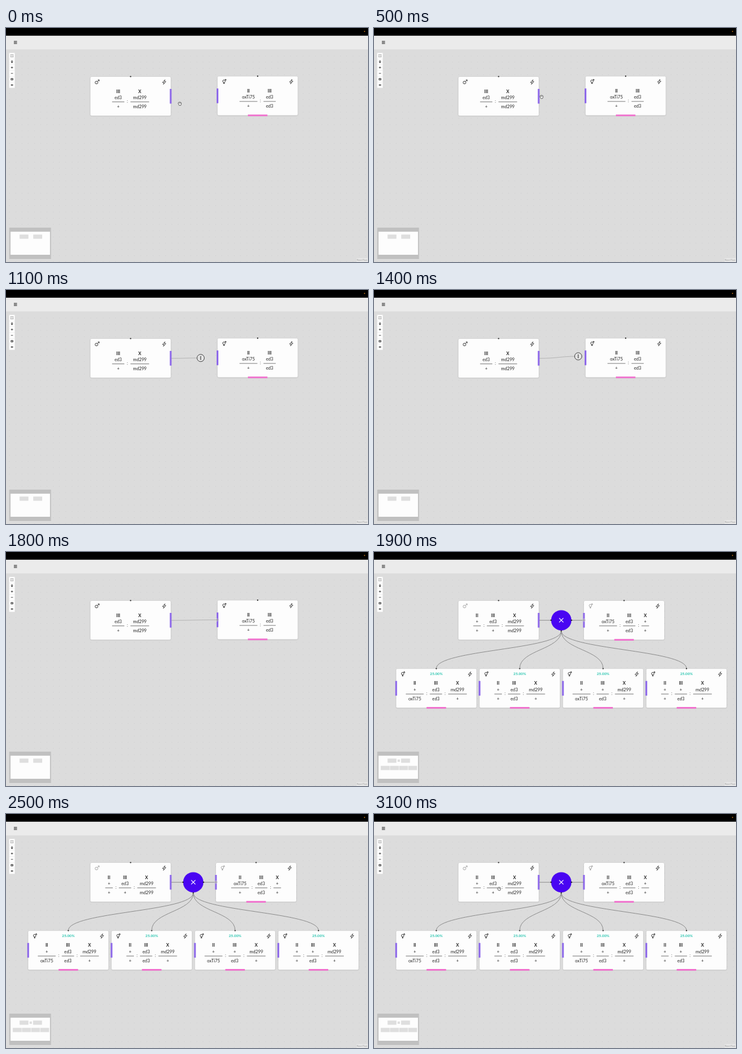
Write an HTML page with a canvas that moves like this. It is 600 px wide and 388 px high and loops after 3200 ms.

```html
<!DOCTYPE html>
<html lang="en">
<head>
<meta charset="utf-8">
<title>Cross editor</title>
<style>
  html, body { margin: 0; width: 100%; height: 100%; overflow: hidden; background: #dcdcdc; }
  canvas { display: block; width: 100%; height: 100%; }
</style>
</head>
<body>
<canvas id="stage"></canvas>
<script>
const W = 600, H = 388, LOOP = 3200, STEP = 100;
const INK = '#242424', PURPLE = '#8d68ea', PINK = '#f070cd', EDGE = '#858585';
const CARD_W = 133, CARD_H = 64.5;
const SANS = 'Lato, sans-serif';

const canvas = document.getElementById('stage');
const ctx = canvas.getContext('2d');
const dpr = window.devicePixelRatio || 1;
canvas.width = W * dpr;
canvas.height = H * dpr;

// Each gene: [chromosome, upper allele, lower allele]
const PARENTS_BEFORE = [
  { x: 140, y: 81, sex: 'male', genes: [['III', 'ed3', '+'], ['X', 'md299', 'md299']] },
  { x: 350.6, y: 80.3, sex: 'both', genes: [['II', 'oxTi75', '+'], ['III', 'ed3', 'ed3']] }
];
const PARENTS_AFTER = [
  { x: 140, y: 81, sex: 'male', faded: true,
    genes: [['II', '+', '+'], ['III', 'ed3', '+'], ['X', 'md299', 'md299']] },
  { x: 348, y: 81, sex: 'both', faded: true,
    genes: [['II', 'oxTi75', '+'], ['III', 'ed3', 'ed3'], ['X', '+', '+']] }
];
const CHILDREN = [['oxTi75', 'ed3'], ['+', 'ed3'], ['oxTi75', '+'], ['+', '+']].map(([low, top], i) => ({
  x: 36.8 + i * 138.2, y: 193.8, sex: 'both', share: '25.00%',
  genes: [['II', '+', low], ['III', top, 'ed3'], ['X', 'md299', '+']]
}));

// Cursor waypoints: [ms, x, y]
const PATH = [
  [0, 288, 125.5], [200, 286, 123], [400, 280, 116], [600, 275.3, 112.3],
  [700, 274.8, 112.8], [800, 284, 115], [900, 300.5, 116.8], [1000, 314, 115],
  [1200, 331.3, 110.5], [1300, 336, 109.8], [1400, 338.5, 110], [1500, 341, 111],
  [1700, 348.3, 113], [1800, 350, 112.6], [1900, 348, 113], [2500, 348, 113],
  [2700, 318, 115], [2900, 240, 121], [3100, 207.3, 124]
];

function cursorAt(t) {
  const i = PATH.findIndex(p => p[0] >= t);
  if (i === 0) return PATH[0].slice(1);
  const [t0, x0, y0] = PATH[i - 1], [t1, x1, y1] = PATH[i];
  const k = (t - t0) / (t1 - t0);
  return [x0 + (x1 - x0) * k, y0 + (y1 - y0) * k];
}

function rect(x, y, w, h, color, r = 0) {
  ctx.fillStyle = color;
  ctx.beginPath();
  ctx.roundRect(x, y, w, h, r);
  ctx.fill();
}

function dot(x, y, r, color) {
  ctx.fillStyle = color;
  ctx.beginPath();
  ctx.arc(x, y, r, 0, 7);
  ctx.fill();
}

function stroke(path, color, width) {
  ctx.strokeStyle = color;
  ctx.lineWidth = width;
  ctx.stroke(new Path2D(path));
}

function at(x, y, draw) {
  ctx.save();
  ctx.translate(x, y);
  draw();
  ctx.restore();
}

function text(s, x, y, size, color = INK, weight = 400, align = 'center') {
  ctx.font = `${weight} ${size}px ${SANS}`;
  ctx.fillStyle = color;
  ctx.textAlign = align;
  ctx.fillText(s, x, y);
}

function sexIcon(x, y, sex, color, width) {
  at(x, y, () => {
    if (sex === 'male') {
      stroke('M1.3 .9A2.3 2.3 0 1 1-3.3 .9A2.3 2.3 0 1 1 1.3 .9M.7-.8L3.4-3.4M1.2-3.4H3.4V-1.2', color, width);
    } else {
      stroke('M1.8-.6A2.1 2.1 0 1 1-2.4-.6A2.1 2.1 0 1 1 1.8-.6M1.2-2.1L3.1-3.5M1.2-3.5H3.1V-1.7M-.3 1.5V4M-1.6 2.8H1', color, width);
    }
  });
}

function bolt(x, y) {
  at(x, y, () => stroke('M1.3-3.8L-2.9 .8H-.2L-1.3 3.9L2.9-.8H.2Z', INK, .75));
}

function genotype(genes, cx, y) {
  const size = 7.25, pad = 8.28, gap = 10.1;
  ctx.font = `400 ${size}px ${SANS}`;
  const widths = genes.map(g => Math.max(ctx.measureText(g[1]).width, ctx.measureText(g[2]).width) + pad);
  const total = widths.reduce((a, b) => a + b, 0) + gap * (genes.length - 1);
  let x = cx - total / 2;
  genes.forEach(([name, top, low], i) => {
    const w = widths[i], mid = x + w / 2;
    text(name, mid, y + 26.5, size, INK, 700);
    text(top, mid, y + 36.8, size);
    text(low, mid, y + 51.8, size);
    rect(x, y + 41.2, w, .7, '#4a4a4a');
    if (i < genes.length - 1) text(':', x + w + gap / 2, y + 42.8, size, '#555');
    x += w + gap;
  });
}

function card({ x, y, sex, genes, share, faded }) {
  const cx = x + CARD_W / 2;
  ctx.save();
  ctx.shadowColor = 'rgba(0,0,0,.2)';
  ctx.shadowBlur = 2 * dpr;
  ctx.shadowOffsetY = .5 * dpr;
  rect(x, y, CARD_W, CARD_H, '#fdfdfd', 2);
  ctx.restore();

  sexIcon(x + 11, y + 8.5, sex, faded ? '#777' : INK, faded ? .6 : .85);
  bolt(x + 122.2, y + 8.6);
  if (share) text(share, cx, y + 10.3, 6.2, '#25c4ae', 700);
  genotype(genes, cx, y);

  dot(cx, y - .5, 1.1, '#222');
  if (sex === 'male') {
    rect(x + 131.5, y + 20, 2.9, 24.4, PURPLE);
  } else {
    rect(x - 1.5, y + 20, 2.9, 24.4, PURPLE);
    rect(cx - 16.2, y + 63.2, 32.4, 2.7, PINK);
  }
}

function background() {
  rect(0, 0, W, H, '#dcdcdc');
  ctx.fillStyle = 'rgba(135,135,145,.42)';
  for (let y = 46; y < H; y += 10.35) {
    for (let x = 5.5; x < W; x += 10.35) ctx.fillRect(x, y, .6, .6);
  }
  rect(0, 12.7, W, 22.8, '#ebebeb');
  rect(0, 0, W, 12.7, '#000');
  dot(594.3, 5.6, .9, '#d48420');
  for (const y of [22, 23.9, 25.8]) rect(13, y - .4, 5.3, .9, '#222');
}

function controls() {
  rect(5.3, 41.3, 9.2, 58, '#fdfdfd', .5);
  for (let i = 1; i < 6; i++) rect(5.3, 41.3 + i * 9.67, 9.2, .4, '#e2e2e2');
  const icons = [
    'M-1.7-.7V-1.7H-.7M.7-1.7H1.7V-.7M1.7 .7V1.7H.7M-.7 1.7H-1.7V.7',
    'M-1 0V-.8A1 1 0 0 1 1-.8V0M-1.1 .3H1.1M-1.1 1H1.1M-1.1 1.5H1.1',
    'M-1.7 0H1.7M0-1.7V1.7',
    'M-1.7 0H1.7',
    'M-1.7-1.3H1.7V1.3H-1.7ZM-1.5 .9L-.4-.1L.3 .5L1 0L1.6 .8',
    'M-1.9 0Q0-2.2 1.9 0Q0 2.2-1.9 0M-.4 0H.4'
  ];
  icons.forEach((icon, i) => at(9.9, 46.2 + i * 9.67, () => stroke(icon, '#1c1c1c', .75)));
}

function minimap(crossed) {
  const node = '#dedede';
  rect(5.4, 331, 69.2, 52, '#c0c0c0');
  rect(7.5, 337.8, 65.4, 38.2, '#fdfdfd');
  rect(22.5, 342.5, 14.7, 7, node);
  rect(crossed ? 44.9 : 45.2, 342.5, 14.8, 7, node);
  if (!crossed) return;
  rect(39.2, 344.2, 3.7, 3.7, node);
  for (let i = 0; i < 4; i++) rect(11.2 + i * 15.2, 354.6, 14.6, 7, node);
}

function crossNode() {
  const x = 310.4, y = 113.2;
  stroke(`M274 ${y}H293.5M327.5 ${y}H347.5`, EDGE, .9);
  for (const c of CHILDREN) {
    const tx = c.x + CARD_W / 2;
    stroke(`M${x} 131C${x} 162 ${tx} 162 ${tx} 193`, EDGE, .9);
  }
  dot(x, y, 16.8, '#4905f2');
  at(x, y, () => stroke('M-3.5-3.5L3.5 3.5M3.5-3.5L-3.5 3.5', '#fff', 1.1));
  for (const [dx, dy] of [[-17, 0], [17, 0], [0, 17.6]]) dot(x + dx, y + dy, 1.1, '#222');
}

function hand() {
  const shape = new Path2D('M-2.7-1.2Q-2-2.6-1-2.3Q0-3.1 1-2.3Q2.4-2.3 2.6-.9Q2.9 1 1.7 2.8H-1Q-2.4 1.2-2.7-1.2Z');
  ctx.fillStyle = '#f4f4f4';
  ctx.fill(shape);
  stroke(shape, '#333', .7);
  stroke('M-1-1.6V-.2M.1-1.8V-.2M1.2-1.6V-.2', '#333', .5);
}

function crosshair() {
  const plus = 'M-2.6 0H2.6M0-2.9V2.9';
  stroke(plus, 'rgba(255,255,255,.8)', 1.3);
  stroke(plus, '#555', .5);
}

function cursor(t) {
  const [x, y] = cursorAt(t);
  const pressed = t >= 700 && t < 1800;
  if (t >= 700 && t < 1900) {
    const mid = (274 + x) / 2;
    stroke(`M274 113.3C${mid} 113.3 ${mid} ${y} ${x} ${y}`, '#999', .6);
  }
  at(x, y, () => {
    if (pressed) {
      dot(0, 0, 6, 'rgba(235,235,235,.65)');
      stroke('M6 0A6 6 0 1 1-6 0A6 6 0 1 1 6 0', '#333', .9);
      stroke('M-1.2-2.4H1.2M0-2.6V2.6M-1.2 2.4H1.2M-1 0H1', '#333', .7);
    } else if (t >= 600 && t <= 2500) {
      crosshair();
    } else {
      hand();
    }
  });
}

function draw(t) {
  const crossed = t >= 1900;
  ctx.setTransform(dpr, 0, 0, dpr, 0, 0);
  ctx.lineCap = 'butt';
  background();
  if (crossed) {
    PARENTS_AFTER.forEach(card);
    CHILDREN.forEach(card);
    crossNode();
  } else {
    PARENTS_BEFORE.forEach(card);
  }
  controls();
  minimap(crossed);
  rect(581, 381.5, 19, 6.5, 'rgba(255,255,255,.3)');
  text('React Flow', 598.8, 385.9, 3.6, '#999', 400, 'right');
  cursor(t);
}

const start = performance.now();
function tick() {
  const t = (performance.now() - start) % LOOP;
  draw(Math.floor(t / STEP) * STEP);
  requestAnimationFrame(tick);
}
tick();
</script>
</body>
</html>
```
